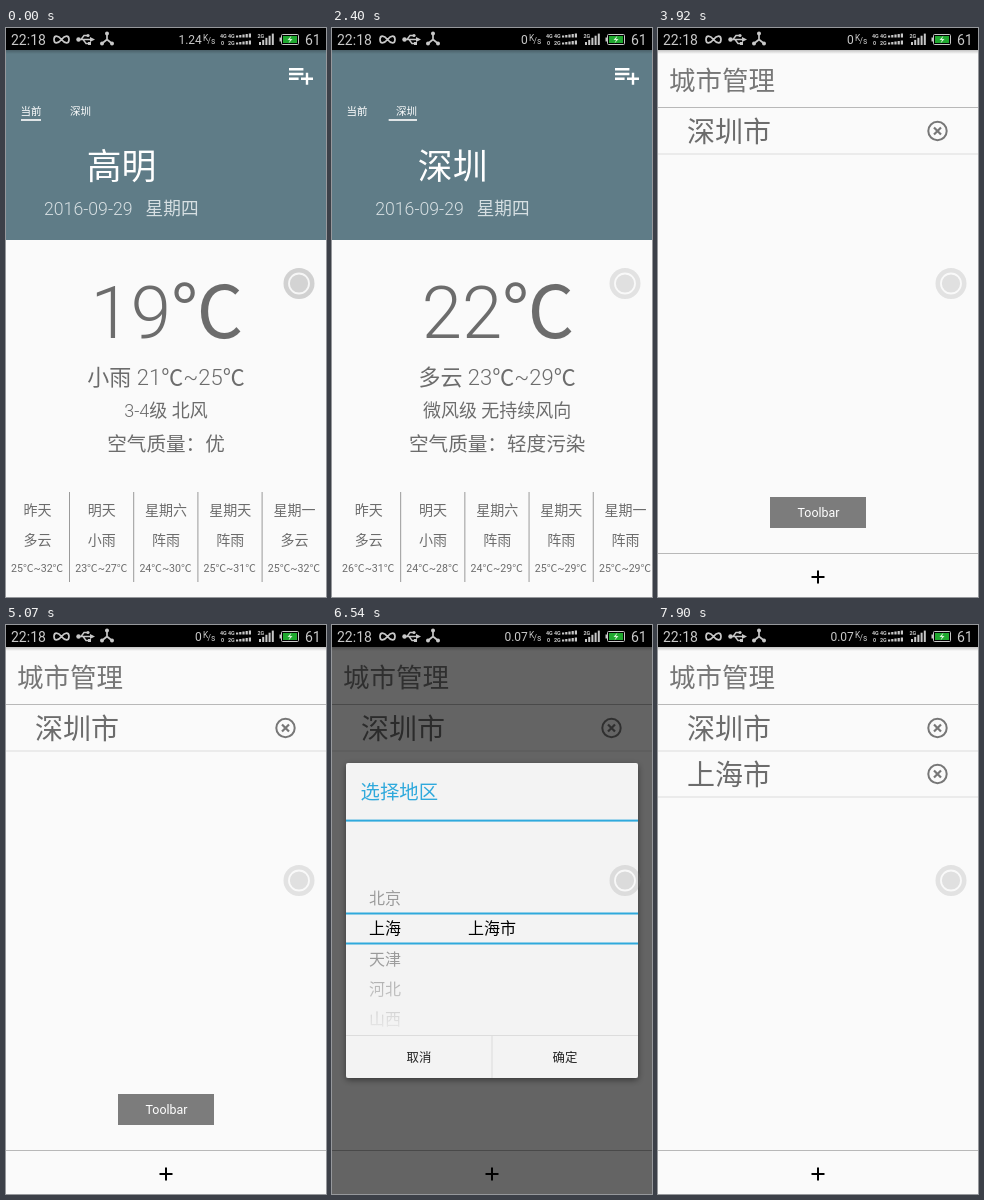
Animation, 320 px wide and 569 px high, one loop 8 s. Source, as an HTML page:

```html
<!DOCTYPE html>
<html lang="zh-CN">
<head>
<meta charset="utf-8">
<title>Weather app</title>
<style>
html, body { margin: 0; width: 100%; height: 100%; overflow: hidden; background: #fafafa; }
svg { display: block; width: 100%; height: 100%; }
text { font-family: Roboto, "Noto Sans CJK SC", "Noto Sans CJK", sans-serif; white-space: pre; }
.unit { font-family: "Noto Sans CJK SC", "Noto Sans CJK", sans-serif; }
</style>
</head>
<body>
<svg id="stage" viewBox="0 0 320 569"></svg>
<script>
const LOOP = 8000;
const ROW = 30.3;
const BAND = 303;

const clamp = v => Math.max(0, Math.min(1, v));
const span = (t, a, b) => clamp((t - a) / (b - a));
const easeOut = (u, n) => 1 - (1 - u) ** n;
const mix = (a, b, u) => a + (b - a) * u;

// Markup helpers; the degree sign takes the full-width glyph
const text = (s, x, y, size, fill, { anchor = 'middle', weight = 350, id = '' } = {}) =>
  `<text ${id && `id="${id}"`} x="${x}" y="${y}" font-size="${size}" fill="${fill}" text-anchor="${anchor}" font-weight="${weight}">${s.replaceAll('℃', '<tspan class="unit">℃</tspan>')}</text>`;
const rect = (x, y, w, h, fill, more = '') =>
  `<rect x="${x}" y="${y}" width="${w}" height="${h}" fill="${fill}" ${more}/>`;
const path = (d, stroke, width, more = '') =>
  `<path d="${d}" fill="none" stroke="${stroke}" stroke-width="${width}" ${more}/>`;
const left = { anchor: 'start' };
const regular = { weight: 400 };
const leftRegular = { ...left, ...regular };

function statusBar() {
  const grey = '#c8c8c8';
  const tiny = (s, x, y) => text(s, x, y, 5.4, grey, { anchor: 'start', weight: 700 });
  const dots = y => Array.from({ length: 5 }, (_, i) =>
    rect(230 + i * 3.2, y - 1 - i * 0.5, 2.2, 2 + i * 0.5, grey)).join('');
  const bars = Array.from({ length: 5 }, (_, i) =>
    rect(253 + i * 3.2, 14 - i * 2.1, 2, 3 + i * 2.1, grey)).join('');
  return rect(0, 0, 320, 22, '#000') +
    text('22:18', 5, 17, 14, grey, leftRegular) +
    path('M55.5 11.5C52 7 48 7 48 11.5S52 16 55.5 11.5S63 7 63 11.5S59 16 55.5 11.5Z', grey, 1.7) +
    path('M71 11.5H85M75 11.5L78 7.5H81M77 11.5L80 15.5H83', grey, 1.4) +
    `<circle cx="72.5" cy="11.5" r="2.2" fill="${grey}"/><path d="M84 9l5 2.5l-5 2.5z" fill="${grey}"/>` +
    `<circle cx="82" cy="7.5" r="1.6" fill="${grey}"/>` + rect(82, 14, 3, 3, grey) +
    path('M101 6V11.5L96 15.5M101 11.5L106 15.5', grey, 1.7) +
    [[101, 5.6], [96, 15.6], [106, 15.6]].map(([x, y]) => `<circle cx="${x}" cy="${y}" r="2" fill="${grey}"/>`).join('') +
    text('', 195.8, 16, 12, grey, { anchor: 'end', weight: 400, id: 'speed' }) +
    text('K', 197, 13, 8.4, grey, leftRegular) + text('/s', 201.5, 16, 8.4, grey, leftRegular) +
    tiny('4G', 214, 9.5) + tiny('4G', 222, 9.5) + tiny('0', 215, 17) + tiny('2G', 222, 17) +
    dots(8.5) + dots(15.5) + tiny('2G', 251.5, 9.5) + bars +
    `<rect x="275.5" y="6.5" width="17" height="10" rx="1" fill="none" stroke="${grey}"/>` +
    rect(273.5, 9.5, 1.6, 4, grey) + rect(277, 8, 14, 7, '#1fa82f') +
    `<path d="M285.5 7.5l-4 4.500h2.500l-1.500 3.500l4-4.500h-2.500z" fill="#d8f5d8"/>` +
    text('61', 299, 17, 14, grey, leftRegular);
}

function weatherPage(p, i) {
  const grey = '#6c6c6c';
  const pale = '#d6dfe2';
  const days = ['昨天', '明天', '星期六', '星期天', '星期一'];
  const column = (day, k) => {
    const x = 31.6 + k * 64.2;
    const rule = k ? rect(x - 32.8, 464, 1, 90, '#9a9a9a') : '';
    const [lo, hi] = p.temps[k];
    return rule + text(day, x, 487, 14, grey) + text(p.sky[k], x, 517, 14, grey) +
      text(`${lo}℃~${hi}℃`, x - 0.5, 543.5, 10.6, grey, regular);
  };
  return `<g transform="translate(${i * 320})">` +
    text(p.city, 115.5, 151, 34.8, '#fff') +
    text('2016-09-29', 38, 187, 17.7, pale, left) + text('星期四', 139.5, 187, 17.7, pale, left) +
    text(`${p.now}℃`, 161, 310, 72.5, grey) +
    text(p.range, 160, 357, 22, grey) +
    text(p.wind, 160, 389, 18, grey) +
    text(`空气质量：${p.air}`, 160, 422.5, 19.6, grey) +
    days.map(column).join('') + '</g>';
}

function weatherScreen() {
  const pages = [
    { city: '高明', now: 19, range: '小雨 21℃~25℃', wind: '3-4级 北风', air: '优',
      sky: ['多云', '小雨', '阵雨', '阵雨', '多云'],
      temps: [[25, 32], [23, 27], [24, 30], [25, 31], [25, 32]] },
    { city: '深圳', now: 22, range: '多云 23℃~29℃', wind: '微风级 无持续风向', air: '轻度污染',
      sky: ['多云', '小雨', '阵雨', '阵雨', '阵雨'],
      temps: [[26, 31], [24, 28], [24, 29], [25, 29], [25, 29]] }
  ];
  return rect(0, 22, 320, 547, '#fafafa') + rect(0, 22, 320, 190, '#5f7c87') +
    rect(0, 22, 320, 4, 'url(#topShade)') +
    `<path transform="translate(280.6 32.8) scale(1.2)" fill="#fff" d="M14 10H2v2h12v-2zm0-4H2v2h12V6zm4 8v-4h-2v4h-4v2h4v4h2v-4h4v-2h-4zM2 16h8v-2H2v2z"/>` +
    text('当前', 14.5, 87, 10.5, '#fff', leftRegular) + text('深圳', 64, 87, 10.5, '#fff', leftRegular) +
    rect(15, 91.2, 20, 1.6, '#fff', 'id="underline"') +
    `<g id="pager">${pages.map(weatherPage).join('')}</g>`;
}

function cityRow(name, y) {
  return text(name, 29, y + 11, 28, '#6c6c6c', left) +
    `<circle cx="279.5" cy="${y}" r="9.2" fill="none" stroke="#777" stroke-width="2"/>` +
    path(`M276 ${y - 3.5}l7 7m0-7l-7 7`, '#777', 2.2) +
    rect(0, y + 22.5, 320, 1, '#dedede');
}

function cityScreen() {
  return rect(0, 22, 320, 600, '#fafafa') + rect(0, 22, 320, 4, 'url(#topShade)') +
    text('城市管理', 11, 61.5, 26.5, '#777', left) + rect(0, 79, 320, 1, '#b8b8b8') +
    cityRow('深圳市', 103) + `<g id="added">${cityRow('上海市', 149)}</g>` +
    rect(0, 525, 320, 1, '#b8b8b8') + path('M153.5 549h13M160 542.5v13', '#000', 2);
}

function wheel(layer, fill) {
  const column = (names, x) => names.map((s, i) =>
    text(s, x, BAND + 6 + i * ROW, 16, fill, regular)).join('');
  return `<g clip-path="url(#${layer})">` +
    `<g class="provinces">${column(['北京', '上海', '天津', '河北', '山西', '内蒙古'], 53)}</g>` +
    `<g class="before">${column(['北京'], 160)}${column(['东城区', '西城区', '崇文区', '宣武区', '朝阳区'], 267)}</g>` +
    `<g class="after">${column(['上海市'], 160)}</g></g>`;
}

function dialog() {
  const blue = '#2fa9dc';
  return `<rect x="14" y="138" width="292" height="315" rx="2" fill="#f3f3f3" filter="url(#drop)"/>` +
    text('选择地区', 28.5, 174, 19.4, blue, left) +
    wheel('wheelArea', '#9a9a9a') +
    rect(14, 196, 292, 75, 'url(#fadeTop)') + rect(14, 335, 292, 75, 'url(#fadeBottom)') +
    rect(14, 288, 292, 30, '#f3f3f3') + wheel('bandArea', '#000') +
    [194.6, 287.5, 317.5].map(y => rect(14, y, 292, 2, blue)).join('') +
    rect(160, 410, 146, 43, '#000', 'id="pressed" opacity=".08"') +
    rect(14, 410, 292, 1, '#dcdcdc') + rect(159.5, 411, 1, 42, '#dcdcdc') +
    text('取消', 87, 436.5, 12.4, '#222', regular) + text('确定', 233, 436.5, 12.4, '#222', regular);
}

const fade = (id, from, to, color) =>
  `<linearGradient id="${id}" x2="0" y2="1"><stop stop-color="${color}" stop-opacity="${from}"/><stop offset="1" stop-color="${color}" stop-opacity="${to}"/></linearGradient>`;

const stage = document.getElementById('stage');
stage.innerHTML = `<defs>
  ${fade('topShade', 0.22, 0, '#000')}
  ${fade('fadeTop', 0.95, 0, '#f3f3f3')}
  ${fade('fadeBottom', 0, 0.95, '#f3f3f3')}
  <clipPath id="wheelArea">${rect(14, 196, 292, 214, '#000')}</clipPath>
  <clipPath id="bandArea">${rect(14, 288, 292, 30, '#000')}</clipPath>
  <filter id="drop" x="-10%" y="-10%" width="120%" height="120%"><feDropShadow dx="0" dy="2" stdDeviation="3" flood-opacity=".45"/></filter>
  </defs>
  <g id="weather">${weatherScreen()}</g>
  <g id="cities">${cityScreen()}</g>
  ${rect(0, 22, 320, 547, '#000', 'id="dim"')}
  <g id="dialog">${dialog()}</g>
  <g id="toast">${rect(112, 469, 96, 31, '#000', 'opacity=".5"')}${text('Toolbar', 160.5, 489, 12.4, '#fff', regular)}</g>
  <g id="dot"><circle id="halo" cx="293" cy="255.5" r="15.5" fill="#808080"/><circle id="core" cx="293" cy="255.5" r="10" fill="#d4d4d4" stroke="#fff" stroke-width="1.8" stroke-opacity=".8"/></g>
  ${statusBar()}`;

const el = {};
stage.querySelectorAll('[id]').forEach(n => { el[n.id] = n; });
const set = (node, attrs) => { for (const k in attrs) node.setAttribute(k, attrs[k]); };
const show = (node, on) => { node.style.display = on ? '' : 'none'; };
const each = (cls, fn) => stage.querySelectorAll('.' + cls).forEach(fn);

// Finger drag followed by a decelerating settle
function swipe(t) {
  const drag = span(t, 1910, 2125);
  return 0.45 * drag * drag + 0.55 * easeOut(span(t, 2125, 2670), 5);
}

function draw(t) {
  el.speed.textContent = t < 1470 ? '1.24' : t < 6400 ? '0' : '0.07';

  const page = swipe(t);
  const start = mix(15, 64, page ** 10);
  const end = mix(35, 85, easeOut(page, 6));
  set(el.pager, { transform: `translate(${-320 * page})` });
  set(el.underline, { x: start, width: end - start });

  const open = span(t, 3300, 3650);
  show(el.cities, open > 0);
  set(el.cities, {
    opacity: easeOut(span(t, 3300, 3500), 2),
    transform: `translate(0 ${45 * (1 - easeOut(open, 4))})`
  });
  show(el.added, t >= 7560);

  const enter = span(t, 5090, 5290);
  const leave = span(t, 7550, 7800);
  const scale = 0.9 + 0.1 * easeOut(enter, 2) - 0.1 * leave;
  show(el.dialog, enter > 0 && leave < 1);
  set(el.dim, { opacity: 0.6 * enter * (1 - leave * leave) });
  set(el.dialog, {
    opacity: enter * (1 - leave),
    transform: `translate(160 295.5) scale(${scale}) translate(-160 -295.5)`
  });
  show(el.pressed, t >= 7360);

  const roll = easeOut(span(t, 5500, 6810), 3);
  each('provinces', n => set(n, { transform: `translate(0 ${-ROW * roll})` }));
  each('before', n => show(n, roll < 0.5));
  each('after', n => show(n, roll >= 0.5));

  set(el.toast, { opacity: span(t, 3500, 3800) * (1 - span(t, 5500, 5800)) });

  const touch = t < 2000 ? 1 - span(t, 50, 820) : span(t, 7360, 7420) * (1 - span(t, 7640, 7880));
  set(el.halo, { opacity: mix(0.2, 0.34, touch) });
  set(el.core, { 'fill-opacity': mix(0.15, 0.6, touch) });
}

function tick() {
  draw(performance.now() % LOOP);
  requestAnimationFrame(tick);
}
tick();
</script>
</body>
</html>
```
